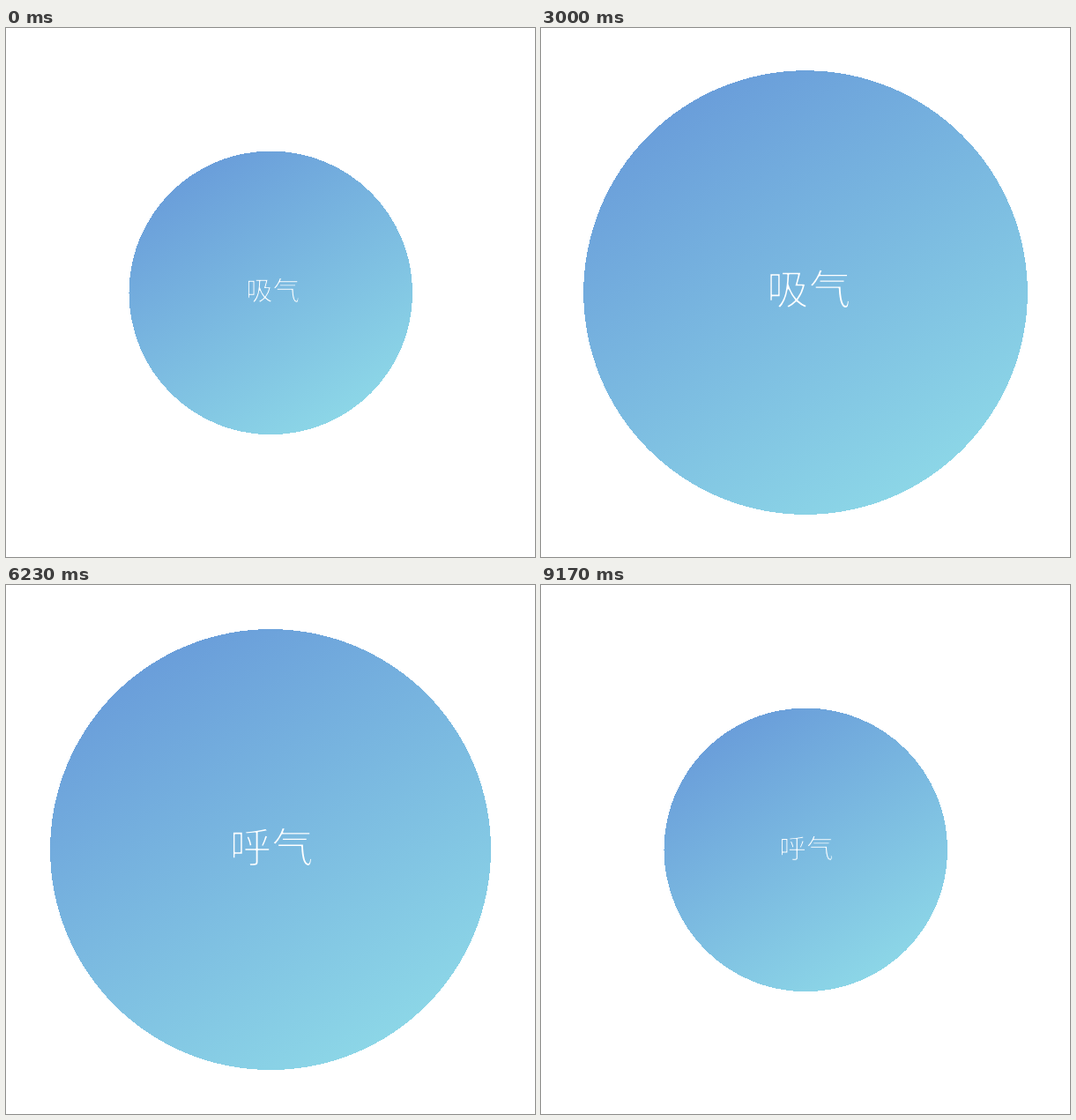
Write an HTML page that moves like this. It is 600x600 px and loops after 9.2 s.

```html
<!DOCTYPE html>
<html lang="zh-CN">
<head>
<meta charset="utf-8">
<title>呼吸</title>
<style>
html, body { margin: 0; width: 100%; height: 100%; overflow: hidden; background: #fff; }
svg { display: block; width: 100vw; height: 100vh; }
text {
  font: 100 51.4px "Noto Sans CJK SC", "Noto Sans CJK", sans-serif;
  fill: #fff;
  stroke-linejoin: round;
  text-rendering: geometricPrecision;
}
</style>
</head>
<body>
<svg viewBox="0 0 600 600">
  <defs>
    <linearGradient id="sky" gradientUnits="userSpaceOnUse" x1="-143" y1="-229" x2="143" y2="229">
      <stop offset="0" stop-color="#6a9eda"/>
      <stop offset="1" stop-color="#8cd6e7"/>
    </linearGradient>
  </defs>
  <g id="ball">
    <circle r="270" fill="url(#sky)" shape-rendering="crispEdges"/>
    <text id="inhale" x="-47.6" y="14.6">吸气</text>
    <text id="exhale" x="-50.3" y="16">呼气</text>
  </g>
</svg>
<script>
const LOOP = 9200, STEP = 30, MOVE = 3600, TURN = 5570;
const SMALL = 160.8, LARGE = 270;
const [ball, inhale, exhale] = ['ball', 'inhale', 'exhale'].map(id => document.getElementById(id));

// Without a thin face, trim the regular strokes with the background gradient.
const pen = document.createElement('canvas').getContext('2d');
const width = weight => {
  pen.font = `${weight} 100px "Noto Sans CJK SC", "Noto Sans CJK", sans-serif`;
  return pen.measureText('mmmmiiii').width;
};
const hasThin = Math.abs(width(100) - width(400)) > 0.5;
for (const label of [inhale, exhale]) {
  label.style.stroke = hasThin ? '#fff' : 'url(#sky)';
  label.style.strokeWidth = hasThin ? 0.4 : 1.9;
}

function draw(ms) {
  const out = ms >= TURN;
  const t = out
    ? TURN + Math.floor((ms - TURN) / STEP) * STEP
    : Math.floor(ms / STEP) * STEP;
  const part = Math.min((out ? t - TURN : t) / MOVE, 1);
  const size = out ? 1 - part : part;
  const radius = SMALL + (LARGE - SMALL) * size;
  const x = 300 + 0.3 * (1 - size), y = 300 + 0.4 * (1 - size);
  ball.setAttribute('transform', `translate(${x} ${y}) scale(${radius / LARGE})`);
  inhale.setAttribute('visibility', out ? 'hidden' : 'visible');
  exhale.setAttribute('visibility', out ? 'visible' : 'hidden');
}

const start = performance.now();
function tick() {
  draw((performance.now() - start) % LOOP);
  requestAnimationFrame(tick);
}
draw(0);
requestAnimationFrame(tick);
</script>
</body>
</html>
```
